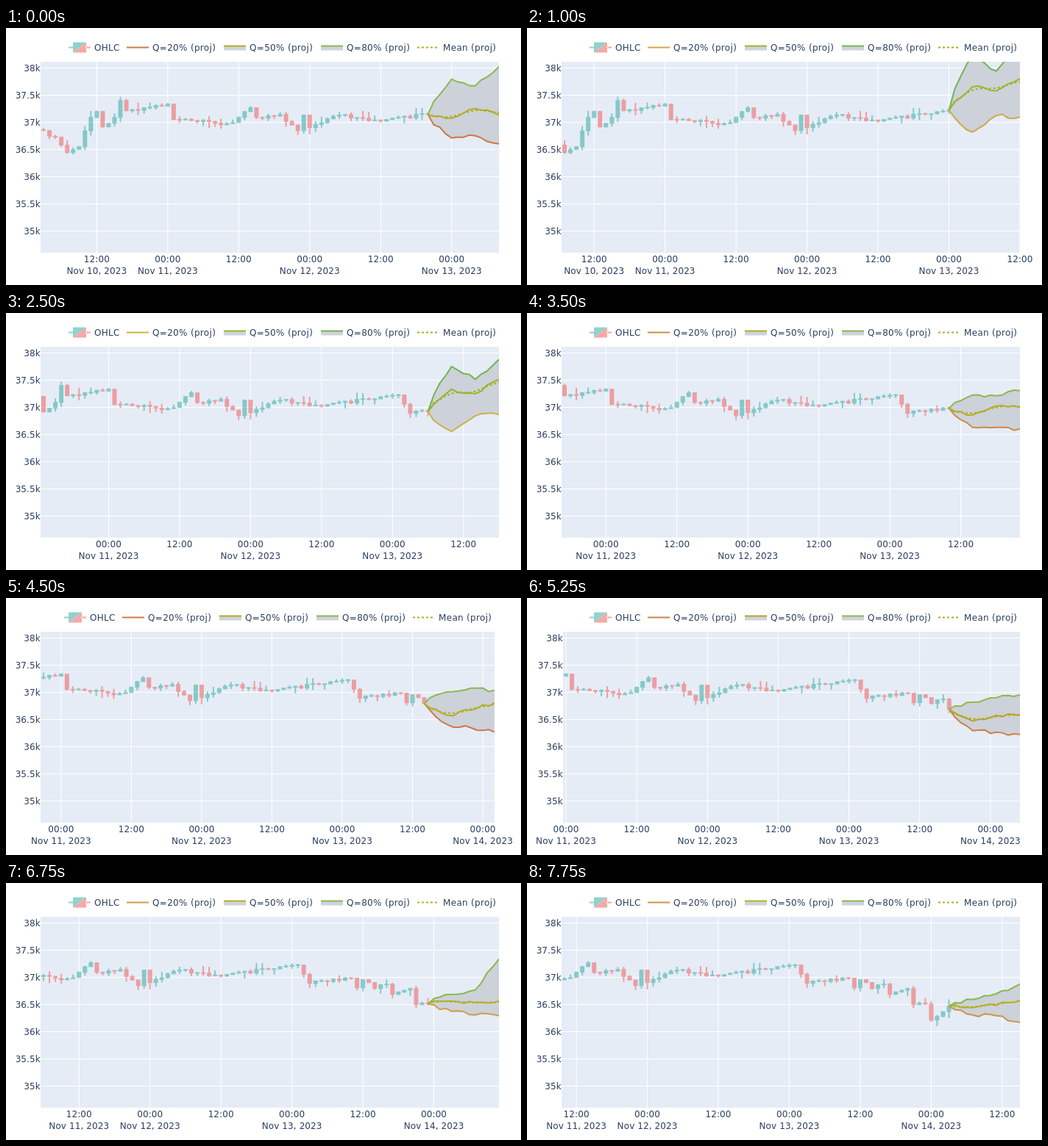
Recreate the animation shown at these times as an HTML page. Size 700 by 350 pixels, loop 8 s.

```html
<!DOCTYPE html>
<html lang="en">
<head>
<meta charset="utf-8">
<title>Hourly price forecast</title>
<style>
  html, body { margin: 0; width: 100%; height: 100%; overflow: hidden; background: #fff; }
  svg { display: block; font: 12px "DejaVu Sans", sans-serif; letter-spacing: .1px; fill: #2a3f5f; }
  .legend { letter-spacing: .32px; }
  .grid { stroke: #fff; }
  .line { fill: none; stroke-width: 2; }
  .band { fill: #cacfd7; fill-opacity: .9; }
</style>
</head>
<body>
<svg id="chart" width="700" height="350" viewBox="0 0 700 350"></svg>
<script>
const STEPS = 32, STEP_MS = 250, HORIZON = 12, HOURS = 77.5;
const TOP = 46, BOTTOM = 306, MIN_LEFT = 47, MAX_RIGHT = 670;
const UP = '#26a69a', DOWN = '#ef5350';

// Turning points of the price: [hours since 10 Nov 03:00, height on the stage].
const turns = [
  [-1, 138], [2, 148], [4, 169], [6, 161], [8, 121], [9, 113], [10, 134], [12, 121], [13, 98],
  [14, 112], [21, 103], [22, 124], [29, 129], [32, 128], [35, 108], [36, 121], [40, 117], [43, 139],
  [44, 118], [45, 135], [50, 118], [57, 126], [65, 117], [70, 111], [72, 136], [79, 129], [80, 142],
  [81, 131], [83, 143], [85, 137], [86, 151], [89, 143], [90, 165], [92, 164], [93, 186], [96, 167]];

// Forecast moods: [step, then offsets from the last close after 4, 8 and 12 hours].
const moods = [
  {step: 0, low: [32, 29, 40], mid: [5, -8, 1], high: [-48, -39, -65]},
  {step: 7, low: [28, -9, -14], mid: [-60, -40, -76], high: [-94, -64, -106]},
  {step: 14, low: [26, 26, 28], mid: [9, -3, -1], high: [-18, -17, -24]},
  {step: 18, low: [29, 33, 39], mid: [16, 9, -1], high: [-16, -21, -18]},
  {step: 21, low: [29, 31, 34], mid: [16, 8, 8], high: [-10, -16, -20]},
  {step: 27, low: [10, 15, 16], mid: [-4, -2, -4], high: [-13, -19, -61]},
  {step: 31, low: [12, 13, 22], mid: [2, -1, -8], high: [-9, -17, -30]}];

const mix = (a, b, t) => a + (b - a) * t;
const random = n => { const s = Math.sin(n * 12.9898) * 43758.5453; return s - Math.floor(s); };
const noise = n => random(n) * 2 - 1;

// Finds the neighbours of a value in a sorted list and the share between them.
function between(list, key, value) {
  const k = Math.max(1, list.findIndex(item => key(item) >= value));
  const a = list[k - 1], b = list[k];
  return [a, b, (value - key(a)) / (key(b) - key(a))];
}

function closeAt(hour) {
  const [a, b, t] = between(turns, turn => turn[0], hour);
  const wobble = t > 0 && t < 1 ? 2.5 * noise(hour) : 0;
  return mix(a[1], b[1], t) + wobble + .7;
}

// Each curve passes its 4-hourly offsets; the hours between are roughened.
function forecastAt(step) {
  const [a, b, t] = between(moods, mood => mood.step, step);
  const start = closeAt(step + 65);
  const curve = (name, seed) => {
    const keys = [0, ...a[name].map((y, i) => mix(y, b[name][i], t))];
    return Array.from({length: HORIZON + 1}, (_, h) => {
      const k = Math.min(2, Math.floor(h / 4)), share = h / 4 - k;
      const rough = h % 4 ? 2.5 * noise(step * 61 + seed + h) : 0;
      return start + mix(keys[k], keys[k + 1], k ? share : share ** .7) + rough;
    });
  };
  const low = curve('low', 0), mid = curve('mid', 17), high = curve('high', 34);
  const mean = mid.map((y, h) => {
    if (!h) return y;
    const near = mid.slice(Math.max(0, h - 2), h + 3);
    return near.reduce((sum, v) => sum + v, 0) / near.length;
  });
  // A rising forecast turns from red towards green.
  const rise = ys => start - ys[HORIZON];
  const colors = [
    `hsl(${50 + .7 * rise(low)} 58% 54%)`,
    `hsl(${57 + .3 * rise(mid)} 68% 42%)`,
    `hsl(${83 + .4 * rise(mid)} 42% 51%)`];
  return {curves: [low, mid, high, mean], colors};
}

const text = (x, y, s, anchor = 'start') => `<text x="${x}" y="${y}" text-anchor="${anchor}">${s}</text>`;
const rect = (x, y, w, h, attrs = '') => `<rect x="${x}" y="${y}" width="${w}" height="${h}" ${attrs}/>`;
const line = (d, color, dash = '') => `<path class="line" d="${d}" stroke="${color}" stroke-dasharray="${dash}"/>`;
const band = d => `<path class="band" d="${d}z"/>`;
const gridLine = d => `<path class="grid" d="${d}"/>`;

function candle(hour, x) {
  const open = closeAt(hour - 1), close = closeAt(hour);
  const height = Math.max(2, Math.abs(close - open) + 1);
  const top = (open + close - height) / 2;
  const wick = seed => 9 * random(hour + seed) ** 3;
  const above = wick(200), below = wick(400);
  const fill = `fill="${close > open ? DOWN : UP}"`;
  return rect(x - 3, top, 6, height, fill) + rect(x - 1, top - above, 2, height + above + below, fill);
}

function legend(shift, [low, mid, high]) {
  const entry = (x, y, label, color, dash) =>
    line(`M${x} ${y}h30`, color, dash) + text(x + 35, 31, label);
  const filled = (x, label, color) => band(`M${x} 24.5h30v6h-30`) + entry(x, 24.5, label, color);
  return `<g class="legend" transform="translate(${shift})">
    <g opacity=".5" transform="translate(100 26.5)">
      <path d="M-15-1h7v2h-7zM-9 7V-7H9z" fill="${UP}"/><path d="M15-1h-7v2h7zM9-7V7H-9z" fill="${DOWN}"/></g>`
    + text(120, 31, 'OHLC') + entry(164, 26.5, 'Q=20% (proj)', low)
    + filled(296, 'Q=50% (proj)', mid) + filled(428, 'Q=80% (proj)', high)
    + entry(559, 26.5, 'Mean (proj)', mid, '3 3') + '</g>';
}

function draw(step) {
  const first = step - .5, last = step + 77, now = step + 65;
  // The plot narrows so that date labels at either end stay on the stage.
  const firstTick = 9 + 12 * Math.max(0, Math.ceil((first - 9) / 12));
  const lastMidnight = 21 + 24 * Math.floor((last - 21) / 24);
  const left = Math.max(MIN_LEFT, 53 - 8 * (firstTick - first));
  const right = Math.min(MAX_RIGHT, 648 + 8 * (last - lastMidnight));
  const xOf = hour => mix(left, right, (hour - first) / HOURS);

  let labels = '', grid = '', candles = '', shownDay = 0;
  for (let price = 35; price <= 38; price += .5) {
    const y = 276.5 - (price - 35) * 74;
    grid += gridLine(`M${left} ${y}H${right}`);
    labels += text(left - .2, y + 4.2, price + 'k', 'end');
  }
  for (let hour = firstTick; hour <= last; hour += 12) {
    const x = xOf(hour), day = 10 + Math.floor((hour + 3) / 24);
    grid += gridLine(`M${x} ${TOP}V${BOTTOM}`);
    labels += text(x, 319, (hour + 3) % 24 ? '12:00' : '00:00', 'middle');
    if (day !== shownDay) labels += text(x, 335, `Nov ${day}, 2023`, 'middle');
    shownDay = day;
  }
  for (let hour = Math.max(0, step - 1); hour <= now; hour++) candles += candle(hour, xOf(hour));

  const {curves, colors} = forecastAt(step);
  const points = curves.map(ys => ys.map((y, h) => `${xOf(now + h).toFixed(2)} ${y.toFixed(2)}`));
  const [low, mid, high, mean] = points.map(p => 'M' + p.join('L'));
  const area = band(low + 'L' + [...points[2]].reverse().join('L'));
  const plot = attrs => rect(left, TOP, right - left, BOTTOM - TOP, attrs);

  chart.innerHTML = `<clipPath id="plot">${plot()}</clipPath>` + plot('fill="#e5ecf6"')
    + `<g clip-path="url(#plot)">${grid}<g opacity=".5">${candles}</g>${area}`
    + line(low, colors[0]) + line(mid, colors[1]) + line(high, colors[2]) + line(mean, colors[1], '3 3')
    + '</g>' + labels + legend(right - MAX_RIGHT, colors);
}

const chart = document.getElementById('chart');
let shown = -1;
function tick() {
  const step = Math.floor(performance.now() / STEP_MS) % STEPS;
  if (step !== shown) draw(shown = step);
  requestAnimationFrame(tick);
}
tick();
</script>
</body>
</html>
```
